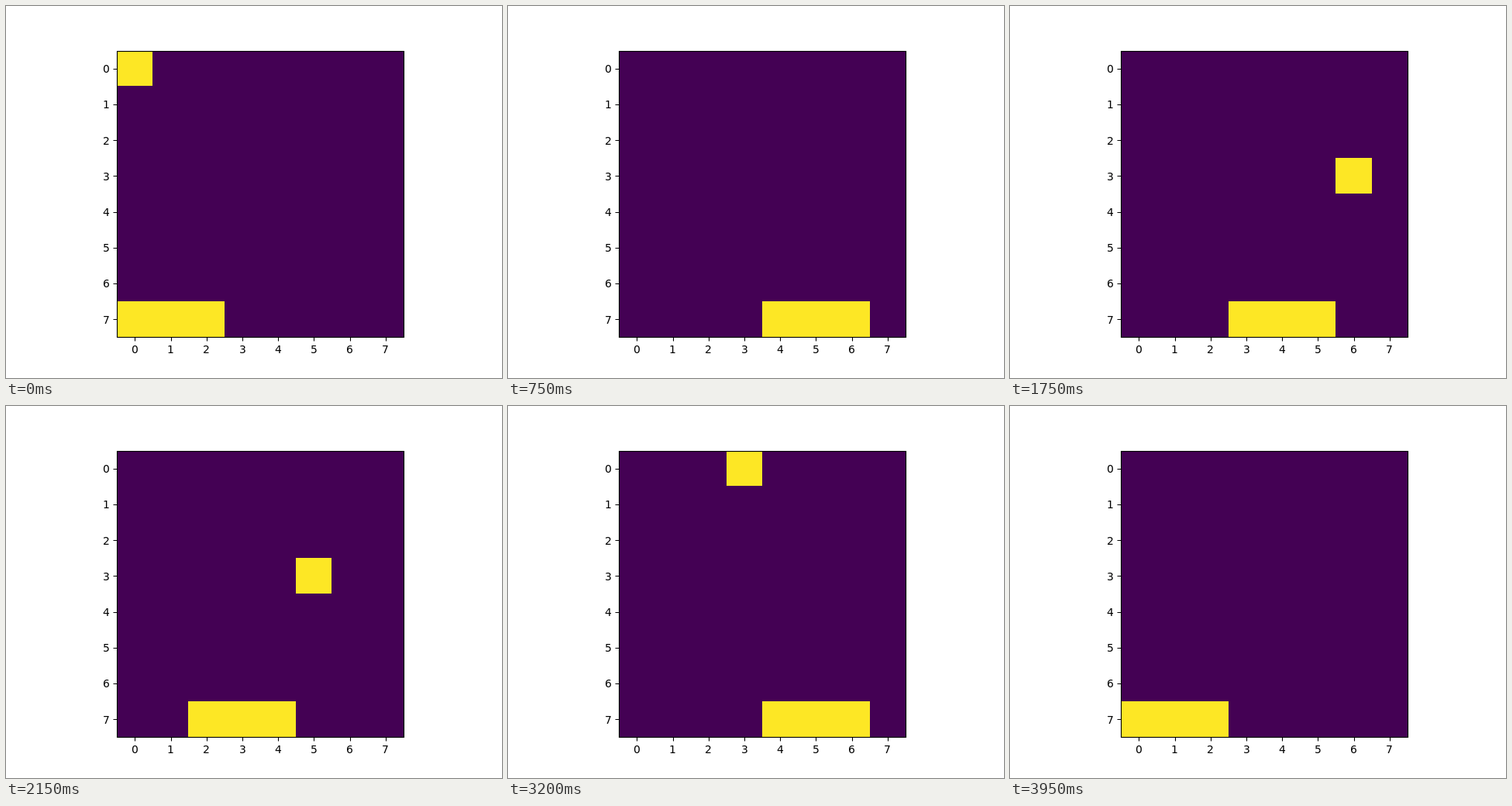
Write an HTML page that moves like this. It is 640 px wide and 480 px high and loops after 4000 ms.

```html
<!DOCTYPE html>
<html lang="en">
<head>
<meta charset="utf-8">
<title>Falling block</title>
<style>
  html, body { margin: 0; width: 100%; height: 100%; overflow: hidden; background: #fff; }
  svg { display: block; }
  text { font: 13.889px "DejaVu Sans", sans-serif; fill: #000; }
  .line { stroke: #000; stroke-width: 1.111; fill: none; }
  .lit { fill: #fde725; }
</style>
</head>
<body>
<svg id="stage" width="640" height="480" viewBox="0 0 640 480">
  <clipPath id="area"><rect x="143" y="58" width="370" height="369"/></clipPath>
  <g clip-path="url(#area)">
    <rect x="143" y="57" width="370" height="370" fill="#440154"/>
    <rect id="ball" class="lit"/>
    <rect id="paddle" class="lit"/>
  </g>
  <rect class="line" x="143.5" y="58.5" width="370" height="369"/>
</svg>
<script>
const SIZE = 8, STEP = 50;
const LEFT = 143, TOP = 57, CELL = 46.25;

// One entry per round: the ball's column and the paddle's centre at each row.
const rounds = [
  [0, "11111111"],
  [6, "44444555"],
  [0, "11111111"],
  [3, "33333333"],
  [6, "44444455"],
  [5, "11233444"],
  [6, "44444445"],
  [0, "22222111"],
  [3, "55555444"],
  [0, "11111111"]
];

const stage = document.getElementById("stage");
const ball = document.getElementById("ball");
const paddle = document.getElementById("paddle");

function add(name, attrs, label = "") {
  const node = document.createElementNS("http://www.w3.org/2000/svg", name);
  for (const key in attrs) node.setAttribute(key, attrs[key]);
  node.textContent = label;
  stage.append(node);
}

function drawAxes() {
  for (let i = 0; i < SIZE; i++) {
    const x = 143.2 + 46.2 * (i + 0.5);
    const y = 57.6 + 46.2 * (i + 0.5);
    const tickX = Math.floor(x + 0.501) + 0.5;
    const tickY = Math.floor(y + 0.501) + 0.5;
    add("path", { class: "line", d: `M${tickX} 427.5v5M143.5 ${tickY}h-5` });
    add("text", { x: Math.round(x - 4.4), y: 448 }, i);
    add("text", { x: 125, y: Math.round(y + 5.41) }, i);
  }
}

// Cell edges sit on whole pixels, with halves rounded down.
const edge = (start, i) => Math.ceil(start + CELL * i - 0.5);

function place(rect, col, row, span) {
  const x = edge(LEFT, col), y = edge(TOP, row);
  rect.setAttribute("x", x);
  rect.setAttribute("y", y);
  rect.setAttribute("width", edge(LEFT, col + span) - x);
  rect.setAttribute("height", edge(TOP, row + 1) - y);
}

function draw(time) {
  const step = Math.floor(time / STEP) % (rounds.length * SIZE);
  const row = step % SIZE;
  const [col, centres] = rounds[Math.floor(step / SIZE)];
  place(ball, col, row, 1);
  place(paddle, centres[row] - 1, SIZE - 1, 3);
}

drawAxes();
draw(0);
const start = performance.now();
function tick() {
  draw(performance.now() - start);
  requestAnimationFrame(tick);
}
requestAnimationFrame(tick);
</script>
</body>
</html>
```
